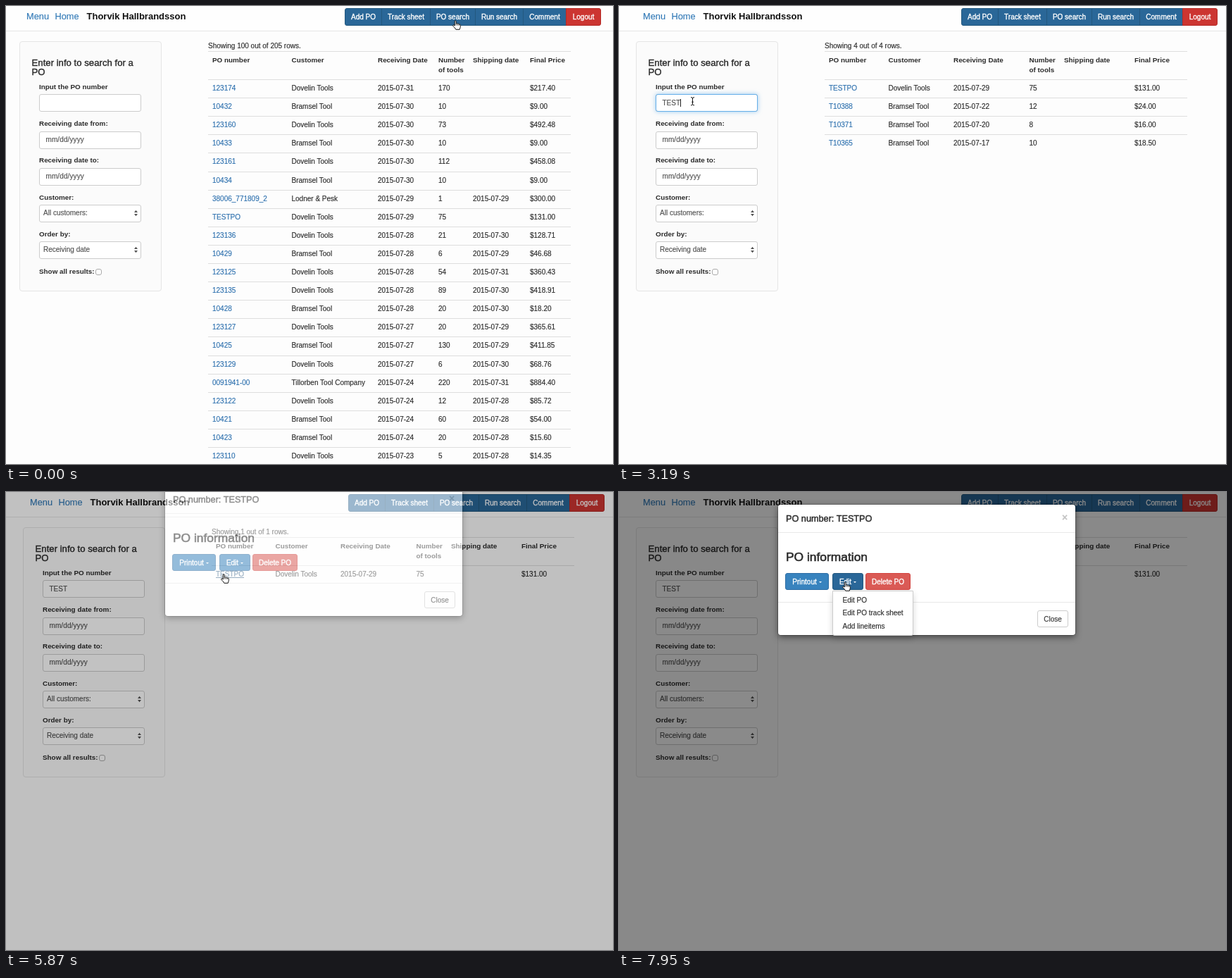
Recreate the animation shown at these times as an HTML page. Size 862 px wide and 650 px high, loop 8000 ms.

```html
<!DOCTYPE html>
<html lang="en">
<head>
<meta charset="utf-8">
<title>PO search</title>
<style>
html, body { margin: 0; width: 100%; height: 100%; overflow: hidden; }
body { background: #fdfdfd; color: #2b2b2b; font: 10px "Liberation Sans", Arial, sans-serif; -webkit-text-stroke: .15px; }
#stage { position: absolute; left: 0; top: 0; width: 862px; height: 650px; overflow: hidden; }
#stage div, #stage svg { position: absolute; box-sizing: border-box; }
#bar { width: 862px; height: 36px; background: #fefefe; border-bottom: 1px solid #e6e6e6; }
.t { white-space: pre; line-height: 20px; margin-top: -10px; }
.b { font-weight: bold; font-size: 9.9px; -webkit-text-stroke: 0; }
.link { color: #2d70ae; }
.nav { font-size: 12.8px; color: #337ab7; }
.name { font-size: 13px; font-weight: bold; color: #111; -webkit-text-stroke: 0; }
.title { font-size: 13.2px; -webkit-text-stroke: .4px; }
.head { font-size: 12.7px; -webkit-text-stroke: .45px; }
.info { font-size: 17.4px; -webkit-text-stroke: .6px; }
.x { font-size: 14px; font-weight: bold; color: #c4c4c4; }
.field { color: #505050; }
.date { color: #505050; letter-spacing: .1px; }
.line { height: 1px; background: #dedede; }
.panel { background: #fbfbfb; border: 1px solid #e5e5e5; border-radius: 4px; }
.input { background: #fff; border: 1px solid #ccc; border-radius: 3px; }
.btn { color: #fff; text-align: center; line-height: 23px; border-radius: 3px; border: 1px solid; white-space: pre; -webkit-text-stroke: .35px; }
.blue { background: #3883be; border-color: #2e6da4; }
.dark { background: #2a6798; border-color: #23587f; }
.red { background: #da5a55; border-color: #d3433f; }
.out { background: #cc3531; border-color: #b52b27; }
.plain { background: #fff; color: #333; border-color: #ccc; -webkit-text-stroke: .15px; }
.btn i { display: inline-block; border: 2.5px solid transparent; border-top-color: #fff; border-bottom: 0; margin-left: 3px; vertical-align: 2px; }
.ring { border: 1px solid #66afe9; border-radius: 3px; box-shadow: 0 0 6px rgba(102, 175, 233, .65); }
#caret { display: inline-block; width: 1px; height: 11px; background: #222; vertical-align: -2px; }
#shade, #modal { left: 226px; width: 422px; height: 185px; border-radius: 4px; }
#shade { box-shadow: 0 0 0 900px #000; }
#modal { background: #fff; box-shadow: 0 0 0 1px rgba(0, 0, 0, .2), 0 3px 10px rgba(0, 0, 0, .5); }
#menu { background: #fff; border: 1px solid #ccc; border-radius: 0 0 3px 3px; box-shadow: 0 4px 8px rgba(0, 0, 0, .17); }
</style>
</head>
<body>
<div id="stage">
  <div id="bar"></div>
  <div id="page"></div>
  <div id="shade"></div>
  <div id="modal"></div>
  <svg id="cursor" width="18" height="20" stroke="#111" stroke-linejoin="round" fill="#fff">
    <g id="hand"><path d="M3.2 8V1.8Q3.2.7 4.2.7T5.2 1.8V5Q6.5 4.2 7.3 5.3Q8.6 4.7 9.3 5.8Q11.4 5.6 11.3 7.6V9.5Q11 11 10.2 13.3H4.8Q3.8 11 .8 8.4Q.4 6.8 1.8 6.8Z"/><path d="M5.2 5v2.6M7.3 5.5v2.2M9.3 6v1.8" fill="none" stroke-width=".8"/></g>
    <path id="arrow" stroke="#fff" fill="#111" d="M.7.8V13.2L3.6 10.5L5.6 15L7.6 14.1L5.7 9.8H9.7Z"/>
    <path id="beam" fill="none" d="M1 .6Q3.5.6 3.5 2.2Q3.5.6 6 .6M3.5 2V10.5M1 11.9Q3.5 11.9 3.5 10.3Q3.5 11.9 6 11.9M2.2 7.2H4.8"/>
  </svg>
</div>
<script>
const LOOP = 8000, SHIFT = 5, PITCH = 26.1;
const $ = id => document.getElementById(id);
const page = $("page"), modal = $("modal"), shade = $("shade"), cursor = $("cursor");

function box(parent, cls, x, y, w, h, html = "") {
  const el = document.createElement("div");
  el.className = cls;
  el.style.cssText = `left:${x}px;top:${y}px;` + (w ? `width:${w}px;` : "") + (h ? `height:${h}px;` : "");
  el.innerHTML = html;
  parent.append(el);
  return el;
}
// y is the middle of the line
const text = (parent, cls, x, y, str) => box(parent, "t " + cls, x, y, 0, 0, str);
const show = (el, on) => { el.style.display = on ? "" : "none"; };

// Top bar
text(page, "nav", 29, 15, "Menu");
text(page, "nav", 69.5, 15, "Home");
text(page, "name", 114.5, 15, "Thorvik Hallbrandsson");
const tabs = [["Add PO", 481], ["Track sheet", 533], ["PO search", 602], ["Run search", 666], ["Comment", 734], ["Logout", 795]];
tabs.forEach(([label, x], i) => {
  const last = i === tabs.length - 1, end = last ? 845 : tabs[i + 1][1] + 1;
  const el = box(page, "btn " + (last ? "out" : "dark"), x, 3, end - x, 25, label);
  el.style.borderRadius = i === 0 ? "3px 0 0 3px" : last ? "0 3px 3px 0" : "0";
});

// Search form
box(page, "panel", 19, 50, 202, 355);
text(page, "title", 36.5, 81, "Enter info to search for a");
text(page, "title", 36.5, 94, "PO");
["Input the PO number", "Receiving date from:", "Receiving date to:", "Customer:", "Order by:"].forEach((label, i) => {
  const y = 115 + i * 52.2;
  text(page, "b", 47, y, label);
  box(page, "input", 47, Math.round(y + 10.4), 145, 25);
});
text(page, "date", 56.5, 190, "mm/dd/yyyy");
text(page, "date", 56.5, 242, "mm/dd/yyyy");
[["All customers:", 294], ["Receiving date", 346]].forEach(([label, y]) => {
  text(page, "field", 53, y, label);
  box(page, "", 181, y - 5, 7, 10, '<svg width="7" height="10" fill="#555"><path d="M1 4L3.5.8L6 4ZM1 6L3.5 9.2L6 6Z"/></svg>');
});
text(page, "b", 47, 377, "Show all results:");
box(page, "input", 127, 373, 9, 9).style.borderColor = "#aaa";
const ring = box(page, "ring", 47, 125, 145, 25);
text(page, "field", 56.5, 138, '<span id="typed"></span><span id="caret"></span>');
const typed = $("typed"), caret = $("caret");

// Result tables
const firms = { D: "Dovelin Tools", B: "Bramsel Tool", L: "Lodner &amp; Pesk", T: "Tillorben Tool Company" };
const heads = ["PO number", "Customer", "Receiving Date", "Number\nof tools", "Shipping date", "Final Price"];
const allRows = `123174|D|07-31|170||217.40
10432|B|07-30|10||9.00
123160|D|07-30|73||492.48
10433|B|07-30|10||9.00
123161|D|07-30|112||458.08
10434|B|07-30|10||9.00
38006_771809_2|L|07-29|1|07-29|300.00
TESTPO|D|07-29|75||131.00
123136|D|07-28|21|07-30|128.71
10429|B|07-28|6|07-29|46.68
123125|D|07-28|54|07-31|360.43
123135|D|07-28|89|07-30|418.91
10428|B|07-28|20|07-30|18.20
123127|D|07-27|20|07-29|365.61
10425|B|07-27|130|07-29|411.85
123129|D|07-27|6|07-30|68.76
0091941-00|T|07-24|220|07-31|884.40
123122|D|07-24|12|07-28|85.72
10421|B|07-24|60|07-28|54.00
10423|B|07-24|20|07-28|15.60
123110|D|07-23|5|07-28|14.35`.split("\n");
const testRow = allRows[7];
const tRows = [testRow, "T10388|B|07-22|12||24.00", "T10371|B|07-20|8||16.00", "T10365|B|07-17|10||18.50"];

function table(rows, note, cols) {
  const el = box(page, "", 0, 0);
  text(el, "", 287, 57, `Showing ${note} rows.`);
  box(el, "line", 287, 64, 515);
  heads.forEach((h, c) => h.split("\n").forEach((s, k) => text(el, "b", cols[c], 77 + 14 * k, s)));
  rows.forEach((row, i) => {
    const [po, firm, got, count, sent, price] = row.split("|");
    const cells = [po, firms[firm], "2015-" + got, count, sent && "2015-" + sent, "$" + price];
    box(el, "line", 287, Math.round(104 + i * PITCH), 515);
    cells.forEach((s, c) => text(el, c ? "" : "link", cols[c], Math.round(117 + i * PITCH), s));
  });
  return el;
}
const narrow = [293, 377.5, 470, 577.5, 627, 727];
const tables = [
  [0, 2640, table(allRows, "100 out of 205", [293, 405.5, 528, 614, 663, 744])],
  [2640, 3310, table(tRows, "4 out of 4", narrow)],
  [3310, LOOP, table([testRow], "1 out of 1", narrow)]
];
const link = tables[2][2].querySelector(".link");

// Dialog
text(modal, "head", 11, 20, "PO number: TESTPO");
text(modal, "x", 403, 18, "×");
box(modal, "line", 0, 39, 422).style.background = "#e8e8e8";
text(modal, "info", 11, 74, "PO information");
box(modal, "btn blue", 10, 97, 62, 24, "Printout<i></i>");
const edit = box(modal, "btn blue", 77, 97, 44, 24, "Edit<i></i>");
box(modal, "btn red", 124, 97, 64, 24, "Delete PO");
box(modal, "line", 0, 138, 422).style.background = "#e8e8e8";
box(modal, "btn plain", 368, 150, 44, 24, "Close");
const menu = box(modal, "", 77, 122, 115, 64);
menu.id = "menu";
["Edit PO", "Edit PO track sheet", "Add lineitems"].forEach((s, i) => text(menu, "", 13.5, 13 + i * 18.3, s));

// Value of the last step reached: rows of [time, value]
const at = (steps, t) => steps.reduce((v, s) => t >= s[0] ? s[1] : v, steps[0][1]);
const typing = [[0, ""], [2400, "T"], [2870, "TE"], [2950, "TES"], [3190, "TEST"]];
const focus = [[0, 0], [1400, .4], [1460, .7], [1630, 1], [5530, .5], [5590, 0]];
const blink = [[0, 0], [1400, 1], [1930, 0], [2400, 1], [3930, 0], [4430, 1], [4930, 0]];
const dim = [[0, 0], [5870, .235], [5950, .455]];
const fade = [[0, 0], [5870, .53], [5950, 1]];
const drop = [[0, -9], [5950, 4], [6160, 18]];

// Pointer moves: start, end, steps, x, y
const moves = [
  [0, 0, 1, 634, 20], [420, 420, 1, 619, 20], [600, 1010, 8, 107, 109], [1220, 1220, 1, 101, 129],
  [4380, 4380, 1, 109.5, 129], [4440, 5170, 14, 302, 119], [5230, 5660, 7, 305, 116], [6400, 6520, 2, 317, 127]
];
function pointer(t) {
  let i = moves.length - 1;
  while (moves[i][0] > t) i--;
  const [start, end, steps, x, y] = moves[i], from = moves[Math.max(0, i - 1)];
  const done = end > start ? Math.floor((t - start) / (end - start) * (steps - 1)) + 1 : 1;
  const p = Math.min(1, done / steps), e = p * p * (3 - 2 * p);
  return [from[3] + (x - from[3]) * e, from[4] + (y - from[4]) * e];
}
function shape(t, x, y) {
  if (t < 1220) return t < 600 || y < 27 ? "hand" : "arrow";
  return x < 193 ? "beam" : x < 290 ? "arrow" : "hand";
}

function draw(t) {
  page.style.left = (t < 2640 ? 0 : SHIFT) + "px";
  tables.forEach(([a, b, el]) => show(el, t >= a && t < b));
  typed.textContent = at(typing, t);
  ring.style.opacity = at(focus, t);
  caret.style.opacity = at(blink, t);

  const [x, y] = pointer(t), kind = shape(t, x, y);
  cursor.style.left = x + "px";
  cursor.style.top = y + "px";
  ["hand", "arrow", "beam"].forEach(k => show($(k), k === kind));
  const over = t > 4380 && kind === "hand" && t < 5950;
  link.style.textDecoration = over ? "underline" : "none";
  link.style.color = over ? "#23527c" : "";

  // The shade surrounds the dialog and leaves its area clear
  shade.style.opacity = at(dim, t);
  modal.style.opacity = at(fade, t);
  shade.style.top = modal.style.top = at(drop, t) + "px";
  show(modal, t >= 5870);
  edit.className = "btn " + (t >= 6400 ? "dark" : "blue");
  show(menu, t >= 6990);
}

const begin = performance.now();
function tick() {
  draw((performance.now() - begin) % LOOP);
  requestAnimationFrame(tick);
}
tick();
</script>
</body>
</html>
```
